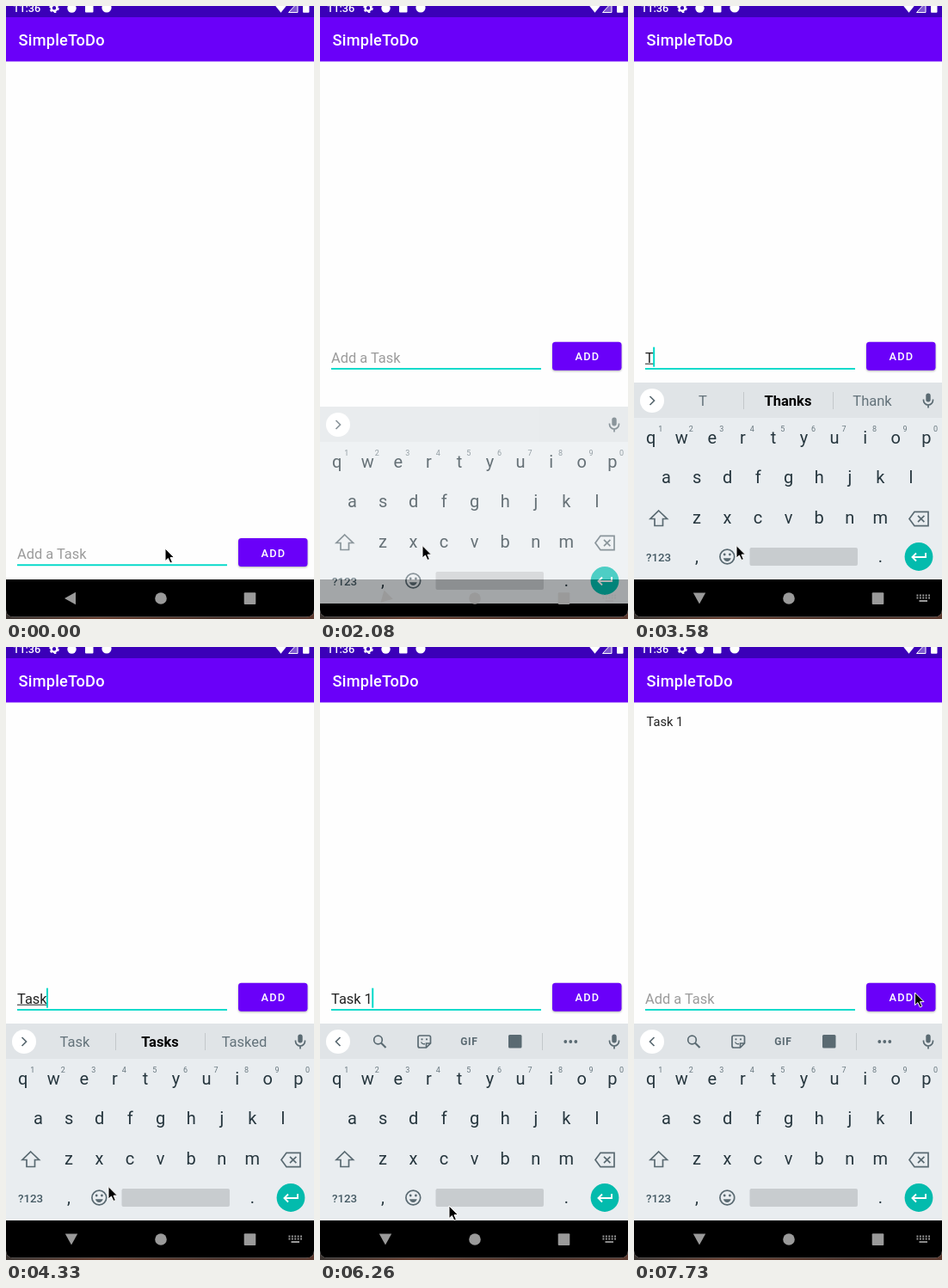
Recreate the animation shown at these times as an HTML page. Size 358 px wide and 713 px high, loop 8000 ms.

```html
<!DOCTYPE html>
<html lang="en">
<head>
<meta charset="utf-8">
<title>SimpleToDo</title>
<style>
html, body { margin: 0; width: 100%; height: 100%; overflow: hidden; background: #000; }
svg { display: block; width: 358px; height: 713px; font-family: Roboto, sans-serif; }
text { white-space: pre; }
.mid { text-anchor: middle; }
.med { font-weight: 500; }
.line { fill: none; stroke: #5a6a72; stroke-width: 1.7; }
</style>
</head>
<body>
<svg id="stage" viewBox="0 0 358 713" xmlns="http://www.w3.org/2000/svg">
  <defs>
    <clipPath id="screen"><path d="M0 0H358V702Q358 710.5 349 710.5H9Q0 710.5 0 702Z"/></clipPath>
    <clipPath id="btnClip"><rect x="270" y="619" width="80.5" height="33" rx="3.5"/></clipPath>
    <linearGradient id="desk">
      <stop offset="0" stop-color="#3a3431"/><stop offset=".3" stop-color="#6b4030"/>
      <stop offset=".7" stop-color="#4a3028"/><stop offset="1" stop-color="#5d3a2f"/>
    </linearGradient>
  </defs>
  <rect y="700" width="358" height="13" fill="url(#desk)"/>
  <g clip-path="url(#screen)">
    <rect width="358" height="713" fill="#fefefe"/>
    <rect width="358" height="64.5" fill="#6a00f9"/>
    <rect width="358" height="13" fill="#3b00b8"/>
    <g id="status" fill="#fff">
      <text class="med" x="8" y="7" font-size="12.75">11:36</text>
      <circle cx="56" cy="2.3" r="3.4" fill="none" stroke="#fff" stroke-width="2.4"/>
      <circle cx="56" cy="2.3" r="5" fill="none" stroke="#fff" stroke-width="1.6" stroke-dasharray="2.6 2.636"/>
      <circle cx="76.5" cy="2.5" r="5.2"/>
      <rect x="92" y="-4" width="9.5" height="11.5" rx="1"/>
      <circle cx="117" cy="2" r="5.6"/>
      <path d="M312.5 -1H326.5L319.5 7.8Z"/>
      <path d="M328.5 7.5H339V-4Z" fill-opacity=".35" stroke="#fff" stroke-width="1"/>
      <rect x="345" y="-3" width="7.5" height="10.8" rx="1"/>
    </g>
    <text class="med" x="14.6" y="46" font-size="18.2" letter-spacing=".23" fill="#fff">SimpleToDo</text>
    <text id="item" x="14.6" y="92" font-size="14.6" fill="#222">Task 1</text>

    <g id="form">
      <text id="hint" x="13" y="643" font-size="16.4" fill="#9b9b9b">Add a Task</text>
      <text id="entry" x="13" y="643" font-size="16.4" fill="#222"></text>
      <rect id="compose" x="13" y="644" height="1" fill="#222"/>
      <rect x="13" y="649.3" width="244" height="1.9" fill="#00d9c9"/>
      <rect id="caret" y="625" width="2" height="23" fill="#00d9c9"/>
      <rect id="btn" x="270" y="619" width="80.5" height="33" rx="3.5" fill="#6a00f9"/>
      <g clip-path="url(#btnClip)"><circle id="ripple" cx="327" cy="631" fill="#fff"/></g>
      <text class="med" x="296.6" y="640.5" font-size="12.75" letter-spacing="1.14" fill="#fff">ADD</text>
    </g>

    <rect y="667" width="358" height="46"/>
    <g id="keyboard">
      <rect y="438" width="358" height="229" fill="#e9edf0"/>
      <rect y="438" width="358" height="41" fill="#e0e4e7"/>
      <circle cx="21" cy="459" r="14" fill="#fff"/>
      <path id="chevron" class="line"/>
      <g id="mic" fill="#5a6a72">
        <rect x="339.3" y="450.5" width="5.4" height="10" rx="2.7"/>
        <path class="line" stroke-width="1.4" d="M336.5 457.5V458.5A5.5 5.5 0 0 0 347.5 458.5V457.5M342 464V467.5"/>
      </g>
      <g id="words">
        <path d="M127.5 449V469M231.5 449V469" stroke="#c3c8cb"/>
      </g>
      <g id="tools" fill="#5a6a72">
        <circle class="line" cx="67.5" cy="457" r="4.8"/>
        <path class="line" d="M71 460.5L76.5 466" style="stroke-width:2.1"/>
        <path class="line" d="M116 452H126.5Q128.5 452 128.5 454V461L123.5 466H116Q114 466 114 464V454Q114 452 116 452ZM123.5 466V461H128.5"/>
        <path class="line" d="M117.5 459.5Q119 462.5 122 461.5" style="stroke-width:1.4"/>
        <circle cx="118.5" cy="456.3" r="1.1"/><circle cx="124" cy="456.3" r="1.1"/>
        <text class="mid" x="173.3" y="463" font-size="12" font-weight="700" letter-spacing=".6">GIF</text>
        <rect x="219" y="451" width="15.5" height="15.5" rx="1.5"/>
        <path d="M258.5 449V469" stroke="#c3c8cb"/>
        <circle cx="285.3" cy="459" r="1.9"/><circle cx="291.3" cy="459" r="1.9"/><circle cx="297.3" cy="459" r="1.9"/>
      </g>
      <g id="keys" fill="#26363e" class="mid"></g>
      <path class="line" d="M28.7 587L38.5 596.5H33.5V604.5H24V596.5H19Z"/>
      <path class="line" d="M326 588.3H342V604.7H326L320 596.5ZM330 592.8L337.4 600.2M337.4 592.8L330 600.2"/>
      <text class="mid med" x="28.5" y="645.5" font-size="13.3" fill="#455a64">?123</text>
      <circle class="line" cx="108.3" cy="640.5" r="8.4"/>
      <path d="M103.8 642.3H112.8Q111.5 646 108.3 646T103.8 642.3Z" fill="#5a6a72"/>
      <circle cx="105.2" cy="638" r="1.4" fill="#5a6a72"/><circle cx="111.4" cy="638" r="1.4" fill="#5a6a72"/>
      <rect x="134.5" y="630" width="125.5" height="21" rx="2" fill="#c8cccf"/>
      <circle cx="331" cy="640.5" r="16.4" fill="#03bbad"/>
      <path d="M339 636V641H324M328 636.5L323.5 641L328 645.5" fill="none" stroke="#fff" stroke-width="1.9"/>
    </g>
    <g fill="#9a9a9a">
      <path id="back" d="M-7.5 0L5.5 -7.2V7.2Z"/>
      <circle cx="180" cy="689" r="6.8"/>
      <rect x="276.7" y="682.3" width="13.6" height="13.6" rx="1"/>
      <g id="imeIcon">
        <path d="M328.5 685.5H344M328.5 688.5H344" stroke="#9a9a9a" stroke-width="1.8" stroke-dasharray="1.9 1.5"/>
        <path d="M331.5 692H341" stroke="#9a9a9a" stroke-width="1.8"/>
      </g>
    </g>
  </g>
  <path id="pointer" d="M0 0V14.6L3.4 11.5L5.9 17L8.4 15.9L6 10.6H10.5Z" fill="#000" stroke="#fff" stroke-width="1" stroke-linejoin="round"/>
</svg>
<script>
const LOOP = 8000, TICK = 148.7;
const $ = id => document.getElementById(id);
const set = (id, attrs) => { for (const k in attrs) $(id).setAttribute(k, attrs[k]); };
const show = (id, on) => set(id, { opacity: +on });

function addText(parent, x, y, str, attrs = {}) {
  const el = document.createElementNS('http://www.w3.org/2000/svg', 'text');
  Object.entries({ x, y, ...attrs }).forEach(([k, v]) => el.setAttribute(k, v));
  el.textContent = str;
  return $(parent).appendChild(el);
}

const PITCH = 35.55;
function addRow(letters, x, y) {
  [...letters].forEach((c, i) => addText('keys', x + i * PITCH, y, c, { 'font-size': 20 }));
}
addRow('qwertyuiop', 19.8, 509);
addRow('asdfghjkl', 37.5, 555.3);
addRow('zxcvbnm', 73, 601.5);
addRow(',', 73, 647);
addRow('.', 286.5, 647);
[...'1234567890'].forEach((c, i) =>
  addText('keys', 30.7 + i * PITCH, 495, c, { 'font-size': 9, fill: '#68777f' }));

const words = [80, 179, 277].map((x, i) => addText('words', x, 465.3, '', {
  class: 'mid', 'font-size': 16.5,
  fill: i === 1 ? '#000' : '#63727a', 'font-weight': i === 1 ? 700 : 400
}));

// Each entry: tick, typed text, suggestions
const typing = [
  [0, '', ''],
  [24, 'T', 'T Thanks Thank'],
  [25, 'Ta', 'Ta Take Talk'],
  [26, 'Tas', 'Tas Task Tasty'],
  [29, 'Task', 'Task Tasks Tasked'],
  [33, 'Task ', 'is force for'],
  [35, 'Task 1', ''],
  [49, '', '']
];
const caretFlips = [2, 6, 9, 12, 16, 19, 22, 39, 41, 44, 49, 52];
const pointerPath = [
  [1, 185, 631], [4, 169, 634], [9, 169, 634], [13, 119, 627.5],
  [40, 119, 627.5], [42, 150, 650], [46, 326.5, 402]
];

function along(path, n) {
  const i = path.findIndex(p => p[0] > n);
  if (i < 0) return path[path.length - 1].slice(1);
  if (!i) return path[0].slice(1);
  const a = path[i - 1], b = path[i], k = (n - a[0]) / (b[0] - a[0]);
  return [1, 2].map(j => a[j] + (b[j] - a[j]) * k);
}

function draw(n) {
  const [, typed, hints] = typing.filter(s => s[0] <= n).pop();
  const open = n >= 14;
  const slide = open ? 1 - 0.5 * Math.pow(0.2, n - 14) * (n < 16) : 0;

  set('form', { transform: `translate(0 ${open ? -228.3 : 0})` });
  set('keyboard', { transform: `translate(0 ${56 * (1 - slide)})`, opacity: open ? 0.4 + 0.6 * slide : 0 });
  set('back', { transform: `translate(${75.5 + slide * 0.5} ${689 - slide}) rotate(${-90 * slide})` });
  show('imeIcon', slide);

  $('entry').textContent = typed;
  const width = typed ? $('entry').getComputedTextLength() : 0;
  show('hint', !typed);
  set('compose', { width: n < 33 ? width : 0 });
  set('caret', { x: 13 + Math.max(0, width - 0.6) });
  show('caret', caretFlips.filter(f => f <= n).length % 2);

  hints.split(' ').forEach((w, i) => { words[i].textContent = w; });
  show('words', hints);
  set('tools', { opacity: n < 35 ? 0 : n < 36 ? 0.5 : 1 });
  set('chevron', { d: n < 36 ? 'M18.5 454L23.5 459L18.5 464' : 'M23.5 454L18.5 459L23.5 464' });

  const pressed = n === 48 || n === 49;
  set('ripple', { r: n === 48 ? 32 : 70, opacity: pressed ? 0.22 : 0 });
  $('btn').style.filter = pressed
    ? 'drop-shadow(0 3px 2px rgba(0,0,0,.35))'
    : 'drop-shadow(0 1px 1px rgba(0,0,0,.3))';
  show('item', n >= 49);

  set('pointer', { transform: `translate(${along(pointerPath, n)})` });
}

let last = -1;
const start = performance.now();
function frame() {
  const t = (performance.now() - start) % LOOP;
  const n = Math.floor((t + 8) / TICK);
  if (n !== last) draw(last = n);
  requestAnimationFrame(frame);
}
frame();
</script>
</body>
</html>
```
